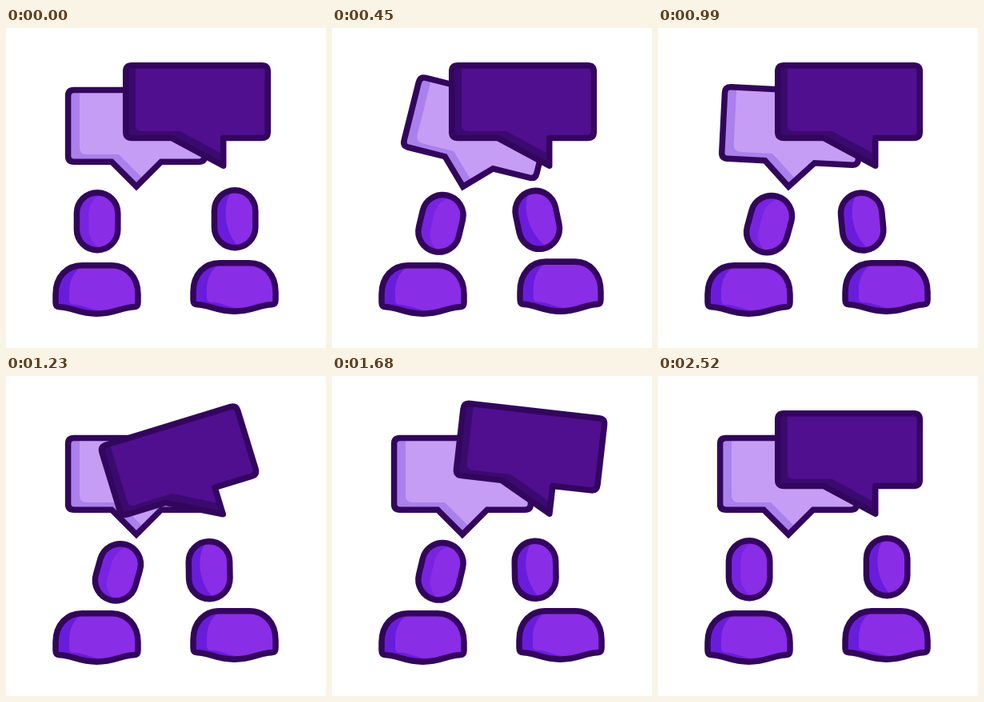
These frames come from a looping animation (400x400 px, 4.55 s). An HTML page:

```html
<!DOCTYPE html>
<html lang="en">
<head>
<meta charset="utf-8">
<title>Conversation</title>
<style>
  html, body { margin: 0; width: 100%; height: 100%; overflow: hidden; background: #fff; }
  svg { display: block; width: 100vw; height: 100vh; }

  .line { fill: none; stroke: #33065d; stroke-width: 7.5; stroke-linejoin: miter; }
  .shade { fill: #6a1cdd; }
  .soft { fill: #7823e1; }
  .skin { fill: #8a2de6; }

  .light, .dark, .lean, .shift, .head, .body {
    animation: 4550ms cubic-bezier(.37, 0, .63, 1) infinite;
  }
  .light { transform-origin: 163px 201px; animation-name: swing-light; }
  .dark { transform-origin: 273px 174px; animation-name: swing-dark; }
  .dark .line { stroke-linejoin: round; }
  .lean { transform-origin: 114px 336px; animation-name: lean; }
  .shift { transform-origin: 114px 241.5px; animation-name: shift; }

  .head { transform-origin: 114px 241.5px; --wide: 1.025 .965; --tall: .99 1.02; --dip: 0 3px; --lift: 0 -2px; }
  .body { transform-origin: 113.5px 360px; --wide: 1.037 .97; --tall: .98 1.025; --dip: 0 0; --lift: 0 0; }
  .left .head, .left .body { animation-name: bounce-left; }
  .right .head, .right .body { animation-name: bounce-right; }

  @keyframes swing-light {
    0%, .2% { rotate: 0deg; }
    4.4% { rotate: -21deg; }
    10.33% { rotate: 14.5deg; }
    15.4% { rotate: -9.3deg; }
    21.2% { rotate: 3deg; }
    25.5%, 100% { rotate: 0deg; }
  }
  @keyframes swing-dark {
    0%, 23.85% { rotate: 0deg; }
    28.35% { rotate: -21deg; }
    34.95% { rotate: 14.5deg; }
    40% { rotate: -9.3deg; }
    45.6% { rotate: 3deg; }
    49.89%, 100% { rotate: 0deg; }
  }
  @keyframes lean {
    0%, .2% { rotate: 0deg; }
    7.69%, 9.89% { rotate: 13.4deg; }
    16.48% { rotate: 14.8deg; }
    27.03% { rotate: 15.9deg; }
    36.92%, 45.27% { rotate: 13.4deg; }
    50.33%, 100% { rotate: 0deg; }
  }
  @keyframes shift {
    0%, .66% { translate: 0 0; rotate: 0deg; }
    9.67% { translate: -29px 3px; rotate: -12deg; }
    17.14% { translate: -29.5px 2.5px; rotate: -12deg; }
    25.5% { translate: -32px 4px; rotate: -1deg; }
    41.32% { translate: -32px 3.5px; rotate: -1deg; }
    46.04%, 100% { translate: 0 0; rotate: 0deg; }
  }
  @keyframes bounce-left {
    0%, .2%, 9.23%, 45.27%, 54.07%, 100% { scale: 1 1; translate: 0 0; }
    3.08%, 47.8% { scale: var(--wide); translate: var(--dip); }
    6.6%, 51.43% { scale: var(--tall); translate: var(--lift); }
  }
  @keyframes bounce-right {
    0%, .66%, 12.75%, 41.32%, 50.3%, 100% { scale: 1 1; translate: 0 0; }
    4.4%, 44.18% { scale: var(--wide); translate: var(--dip); }
    9.45%, 47.69% { scale: var(--tall); translate: var(--lift); }
  }
</style>
</head>
<body>
<svg viewBox="0 0 400 400">
  <defs>
    <rect id="head" x="88.4" y="205.7" width="51.4" height="72" rx="25.7"/>
    <path id="body" d="M62 343V333C62 311 76 296.7 95 296.7H132C151 296.7 165 311 165 333V343Q165 348.7 160 348.7C144 349.2 136 357.2 113.5 357.2C91 357.2 83 349.2 67 348.7Q62 348.7 62 343Z"/>
    <path id="light" d="M85 77.6H241Q248.4 77.6 248.4 85V160Q248.4 167.2 241 167.2H194L163 198.2L132 167.2H85Q77.6 167.2 77.6 160V85Q77.6 77.6 85 77.6Z"/>
    <path id="dark" d="M157.5 46.7H319.5Q327.3 46.7 327.3 54.5V129.7Q327.3 137.4 319.5 137.4H271.7V172.3L207 137.4H157.5Q149.7 137.4 149.7 129.7V54.5Q149.7 46.7 157.5 46.7Z"/>
    <clipPath id="in-head"><use href="#head"/></clipPath>
    <clipPath id="in-body"><use href="#body"/></clipPath>
    <clipPath id="in-light"><use href="#light"/></clipPath>
    <clipPath id="in-dark"><use href="#dark"/></clipPath>

    <g id="body-art">
      <use href="#body" class="shade"/>
      <g clip-path="url(#in-body)"><use href="#body" x="17" y="-3" class="skin"/></g>
      <use href="#body" class="line"/>
    </g>
  </defs>

  <g class="light">
    <use href="#light" fill="#aa80ec"/>
    <path clip-path="url(#in-light)" fill="#c59df4" d="M92 70V149Q92 158 101 158H141L174 191L200 170H255V70Z"/>
    <use href="#light" class="line"/>
  </g>
  <g class="dark">
    <use href="#dark" fill="#3b0a70"/>
    <path clip-path="url(#in-dark)" fill="#4f0f8f" d="M162 40V121Q162 129 170 129H218L275 160V140H335V40Z"/>
    <use href="#dark" class="line"/>
  </g>

  <g class="left">
    <g class="body"><use href="#body-art"/></g>
    <g class="lean"><g class="head">
      <use href="#head" class="soft"/>
      <g clip-path="url(#in-head)"><use href="#head" x="15" class="skin"/></g>
      <use href="#head" class="line"/>
    </g></g>
  </g>
  <g class="right" transform="translate(172 -3)">
    <g class="body"><use href="#body-art"/></g>
    <g class="shift"><g class="head">
      <use href="#head" class="shade"/>
      <path clip-path="url(#in-head)" class="skin" d="M113 204C97 221 99 257 120 278H145V204Z"/>
      <use href="#head" class="line"/>
    </g></g>
  </g>
</svg>
</body>
</html>
```
